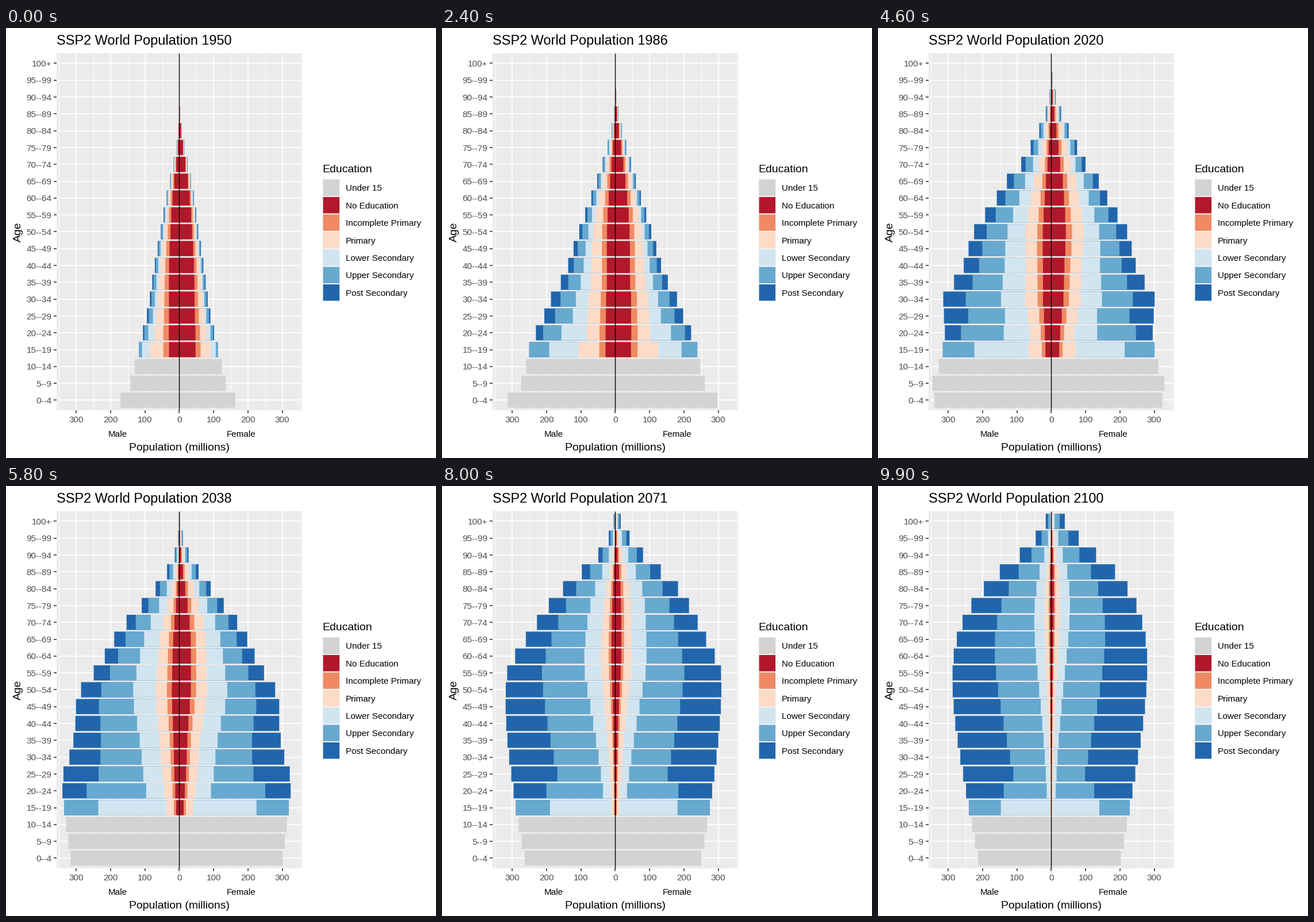
Animation, 748 px wide and 748 px high, one loop 10 s. Source, as a matplotlib script:

```python
import numpy as np
import matplotlib.pyplot as plt
from matplotlib.animation import FuncAnimation
from matplotlib.patches import Rectangle

SIZE, DPI, FRAMES = 748, 100, 100
PT = 72 / DPI
X0, UNIT = 301.5, 0.5973          # zero line, pixels per million
LEFT, RIGHT, TOP, BOTTOM = 88, 515, 43.7, 665
ROW = 29.3
AGES = np.arange(21)
YEARS = np.arange(1950, 2101, 5)
NODES = np.rint((FRAMES - 1) * np.linspace(0, 1, len(YEARS)))
EDU = ["Under 15", "No Education", "Incomplete Primary", "Primary",
       "Lower Secondary", "Upper Secondary", "Post Secondary"]
COLORS = ["#D3D3D3", "#B2182B", "#EF8A62", "#FDDBC7", "#D1E5F0", "#67A9CF", "#2166AC"]

# Millions of boys surviving early childhood, by birth cohort
COHORT = {1880: 63, 1900: 69, 1923: 93, 1935: 119, 1950: 155, 1955: 188,
          1960: 203, 1970: 250, 1980: 267, 1985: 292, 1990: 321, 2002: 311,
          2010: 329, 2015: 347, 2038: 318, 2059: 287, 2100: 213.5}

# Log-odds of a man reaching at most each education level, by birth year
BORN = [1880, 1930, 1950, 1975, 2010, 2085]
LOG_ODDS = [
    [0.55, -0.97, -1.70, -2.15, -3.05, -6.6],
    [1.1, -0.31, -1.14, -1.57, -2.55, -5.7],
    [1.9, 0.69, -0.22, -0.81, -1.70, -4.3],
    [2.5, 1.30, 0.52, 0.22, -0.76, -3.1],
    [3.7, 2.60, 1.80, 1.62, 0.85, -0.5],
]


def hazard(year, female):
    """Cumulative Gompertz mortality, with life spans growing over time."""
    life_span = np.interp(year, [1950, 2038, 2100], [13.3, 15.87, 17.42]) + 0.9 * female
    return np.exp(0.42 * (AGES - life_span))


def totals(year, female):
    size = np.interp(year - 5 * AGES, list(COHORT), list(COHORT.values()))
    size[0] /= np.interp(year, [1950, 1975, 2015], [0.9, 0.945, 1])   # child deaths
    return size * (0.95 if female else 1) * np.exp(-hazard(year, female))


def shares(year, female):
    """Cumulative education shares, levels by age groups."""
    born = year - 5 * AGES - 2.5
    odds = np.array([np.interp(born, BORN, level) for level in LOG_ODDS])

    # Young people who are still in school
    early = 0.4 * np.interp(year, [2000, 2040], [1, 0])
    odds[2, 3] += early
    odds[3, 3] = np.interp(year, [1950, 1975, 2000, 2040, 2100], [2.5, 1.45, 0.92, 0.87, 0.46])
    odds[3, 4] += early
    odds[4, 4] += 0.6

    if female:
        odds += np.linspace(0.37, -0.12, 5)[:, None]
        odds += 0.38 * np.interp(born, [1950, 2000], [1, 0])
    odds[4, 3] = 99

    # The better educated live longer
    cum = (1 + np.exp(-odds)) ** -(1 + 0.28 * hazard(year, female))
    cum[:, :3] = 0
    return np.vstack([cum, np.ones(21)])


def pyramid(female):
    return np.array([totals(y, female) * shares(y, female) for y in YEARS])


plt.rcParams["font.family"] = "Liberation Sans"
fig = plt.figure(figsize=(SIZE / DPI, SIZE / DPI), dpi=DPI, facecolor="white")
ax = fig.add_axes([0, 0, 1, 1])
ax.axis("off")


def line(x, y, color, width, z=1):
    ax.plot(x, y, color=color, lw=width * PT, zorder=z, solid_capstyle="butt")


def box(x, y, w, h, color, z=0):
    ax.add_patch(Rectangle((x, y), w, h, fc=color, lw=0, zorder=z, snap=False))


def label(x, y, s, size=15.3, color="black", ha="left", **kw):
    return ax.text(x, y, s, fontsize=size * PT, color=color, ha=ha, va="baseline", **kw)


# Panel, grid and axes
box(LEFT, TOP, RIGHT - LEFT, BOTTOM - TOP, "#EBEBEB")
row_y = BOTTOM - ROW * (AGES + 0.6)
for m in range(-350, 351, 50):
    x = X0 + m * UNIT
    major = m % 100 == 0
    line([x, x], [TOP, BOTTOM], "white", 1.8 if major else 0.9)
    if major:
        line([x, x], [BOTTOM, BOTTOM + 4.7], "#333333", 1.6)
        label(x, 686, str(abs(m)), color="#4D4D4D", ha="center")
for a, y in zip(AGES, row_y):
    line([LEFT, RIGHT], [y, y], "white", 1.8)
    line([LEFT - 4.7, LEFT], [y, y], "#333333", 1.6)
    name = "100+" if a == 20 else f"{5 * a}--{5 * a + 4}"
    label(79.5, y + 5.6, name, color="#4D4D4D", ha="right")
line([X0, X0], [TOP, BOTTOM], "black", 1.4, 5)

title = label(88, 28.5, "", 23.5)
label(X0 - 180 * UNIT, 711.3, "Male", ha="center")
label(X0 + 180 * UNIT, 711.3, "Female", ha="center")
label(X0, 734.7, "Population (millions)", 19.4, ha="center")
label(25.5, 354.5, "Age", 19.4, ha="center", rotation=90, rotation_mode="anchor")

# Legend
label(550.5, 250.7, "Education", 19.4)
for k, (name, color) in enumerate(zip(EDU, COLORS)):
    y = 262.6 + 30.4 * k
    box(550.6, y, 30.4, 30.4, "#F2F2F2")
    box(551.6, y + 1, 28.4, 28.4, color, 1)
    label(591, y + 20.7, name)

# Nested bars: the widest level lies at the back
DATA = {-1: pyramid(False), 1: pyramid(True)}
bars = {}
for side in DATA:
    for level in range(6):
        fill = [COLORS[0]] * 3 + [COLORS[level + 1]] * 18
        bars[side, level] = ax.barh(row_y, 0, 0.9 * ROW, left=X0, color=fill, lw=0,
                                    snap=False, zorder=4 - 0.2 * level)
ax.set(xlim=(0, SIZE), ylim=(SIZE, 0))


def update(i):
    title.set_text(f"SSP2 World Population {1950 + round(150 * i / (FRAMES - 1))}")
    step = np.interp(i, NODES, np.arange(len(YEARS)))
    k = min(int(step), len(YEARS) - 2)
    for side, data in DATA.items():
        widths = side * UNIT * (data[k] + (step - k) * (data[k + 1] - data[k]))
        for level in range(6):
            for bar, w in zip(bars[side, level], widths[level]):
                bar.set_width(w)
    return []


anim = FuncAnimation(fig, update, frames=FRAMES, interval=100, repeat=True,
                     repeat_delay=0, blit=False)
plt.show()
```
